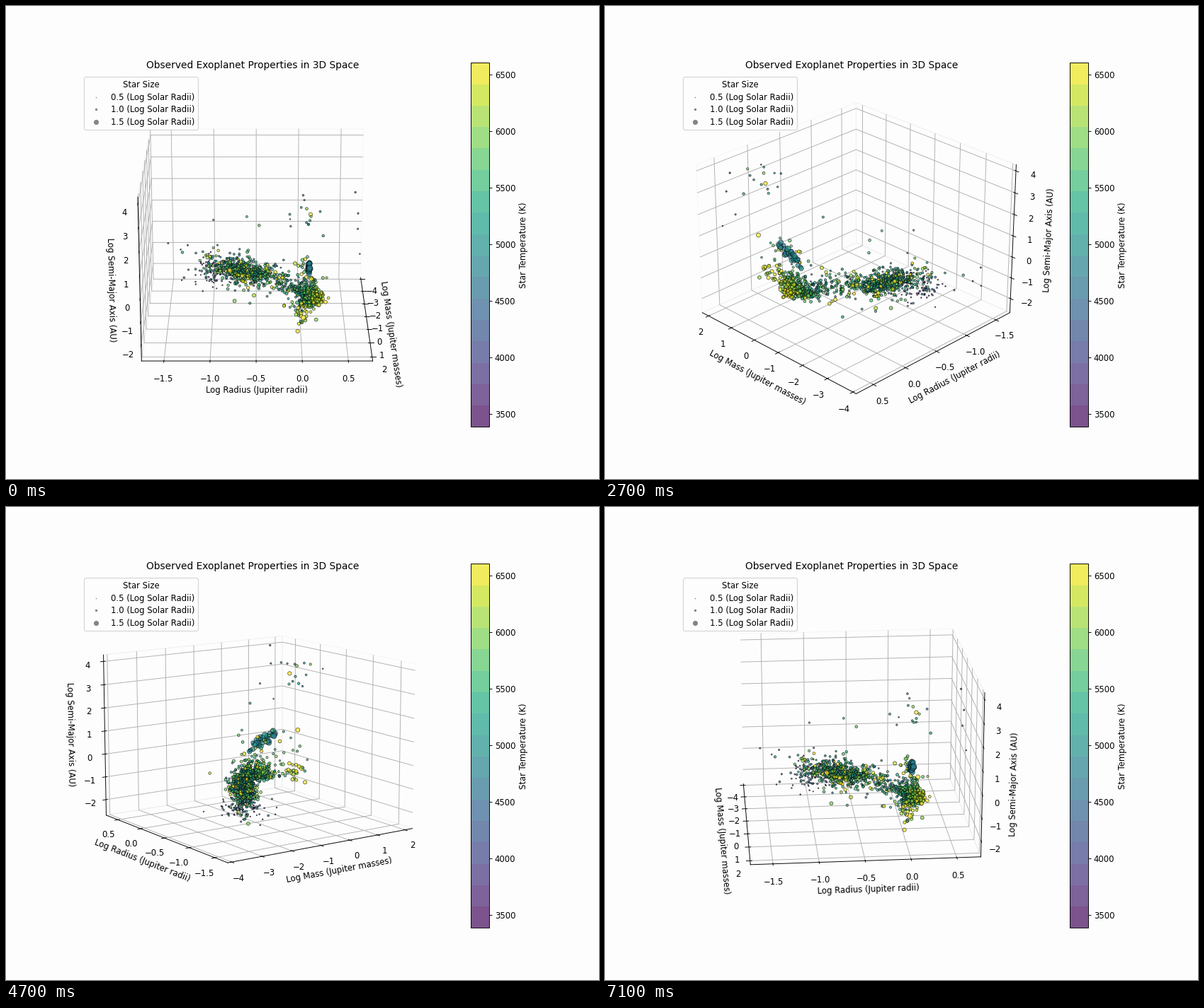
A matplotlib script that plays this animation: 837 by 669 pixels, repeating every 7.2 s.

```python
import matplotlib.pyplot as plt
import numpy as np
from matplotlib.animation import FuncAnimation
from matplotlib.lines import Line2D

FRAMES, INTERVAL = 72, 100
T_MIN, T_MAX = 3388, 6604

rng = np.random.default_rng(12)
clouds = []


def add(mass, rad, sma, temp, size=None):
    """Store planets; hotter stars are drawn larger unless a size is given."""
    if size is None:
        size = 8.5 * (temp / 5500) ** 3 * rng.lognormal(0, 0.25, len(temp))
    clouds.append(np.column_stack([mass, rad, np.clip(sma, -2.4, 4.1), temp, size]))


def blob(n, mass, rad, sma, temp):
    """Cloud of n planets, each property given as (mean, spread)."""
    add(*(rng.normal(mean, spread, n) for mean, spread in (mass, rad, sma, temp)))


def orbits(n, mean, scale):
    """Dense core of orbits with a few far outside it."""
    return mean + scale * rng.standard_t(3, n)


# Small planets whose radius follows their mass
n = 520
m = rng.normal(-1.75, 0.27, n)
add(m, -0.68 + 0.5 * (m + 1.75) + rng.normal(0, 0.12, n),
    orbits(n, -1.0, 0.21), rng.normal(5350, 600, n))

# Bridge between the small planets and the giants
n = 150
m = rng.uniform(-1.6, -0.3, n)
add(m, 0.12 + 0.42 * m + rng.normal(0, 0.09, n),
    orbits(n, -1.05, 0.24), rng.normal(5400, 500, n))

# Hot giants: widest near Jupiter's mass, wider around hotter stars
n = 450
m = rng.normal(-0.03, 0.36, n)
r = (0.13 - 0.15 * np.maximum(m, 0) - 0.3 * np.maximum(-m - 0.1, 0)
     + rng.normal(0, 0.065, n))
a = -1.42 + rng.gamma(1.2, 0.2, n)
add(m, r, a, 5750 + 3200 * (r - 0.08) + 400 * m - 400 * (a + 1.2) + rng.normal(0, 380, n))

# Planets of giant stars, all of nearly one radius
n = 32
m = rng.normal(0.27, 0.22, n)
add(m, rng.normal(0.085, 0.006, n), 0.15 + 0.4 * m + rng.normal(0, 0.13, n),
    rng.normal(4850, 160, n), rng.uniform(14, 50, n))

blob(85, (-2.25, 0.36), (-0.97, 0.13), (-1.4, 0.32), (3750, 480))   # dwarf stars
blob(24, (1.4, 0.25), (0.0, 0.06), (-1.25, 0.2), (6000, 450))       # heavy and close
blob(28, (0.4, 0.65), (0.05, 0.06), (-0.2, 0.45), (5700, 500))      # cool giants
blob(14, (1.5, 0.3), (0.05, 0.08), (3.1, 0.45), (5200, 900))        # very wide orbits
blob(4, (1.5, 0.17), (0.57, 0.03), (2.7, 0.6), (4000, 300))         # wide and puffy
blob(6, (-2.9, 0.6), (-1.35, 0.1), (-1.1, 0.5), (4400, 700))        # smallest

mass, rad, sma, temp, size = np.vstack(clouds).T

plt.rcParams.update({"figure.facecolor": "#fdfdfd", "axes.facecolor": "#fdfdfd"})
fig = plt.figure(figsize=(10, 7.993), dpi=83.7)
ax = fig.add_subplot(projection="3d")
dots = ax.scatter(mass, rad, sma, c=temp, s=size, cmap="viridis", vmin=T_MIN, vmax=T_MAX,
                  alpha=0.7, edgecolors="black", linewidths=0.6, depthshade=False)

bar = fig.colorbar(dots, ax=ax, pad=0.1, boundaries=np.linspace(T_MIN, T_MAX, 18),
                   spacing="proportional", ticks=range(3500, 6501, 500), format="%d")
bar.set_label("Star Temperature (K)")

ax.set_title("Observed Exoplanet Properties in 3D Space", fontsize=11.9)
ax.set_xlabel("Log Mass (Jupiter masses)")
ax.set_ylabel("Log Radius (Jupiter radii)")
ax.set_zlabel("Log Semi-Major Axis (AU)")
ax.set_xticks(range(-4, 3))
ax.set_yticks(np.arange(-1.5, 0.6, 0.5))
ax.set_zticks(range(-2, 5))
ax.set_xlim(-4.125, 2.278)
ax.set_ylim(-1.743, 0.764)
ax.set_zlim(-2.686, 4.28)
for axis in (ax.xaxis, ax.yaxis, ax.zaxis):
    axis.pane.fill = False

keys = [Line2D([], [], ls="", marker="o", ms=1.4 * 4.4 ** (value - 0.5), mew=0,
               color="#858585", label=f"{value} (Log Solar Radii)")
        for value in (0.5, 1.0, 1.5)]
ax.legend(handles=keys, title="Star Size", loc="upper left", labelspacing=0.39)


def update(i):
    # Slightly off the right angles, so the visible walls stay well defined
    azim = 0.001 + 4.9999 * i
    ax.view_init(elev=20 + 10 * np.sin(np.radians(azim)), azim=azim)
    return (dots,)


anim = FuncAnimation(fig, update, frames=FRAMES, interval=INTERVAL, repeat=True)
plt.show()
```
